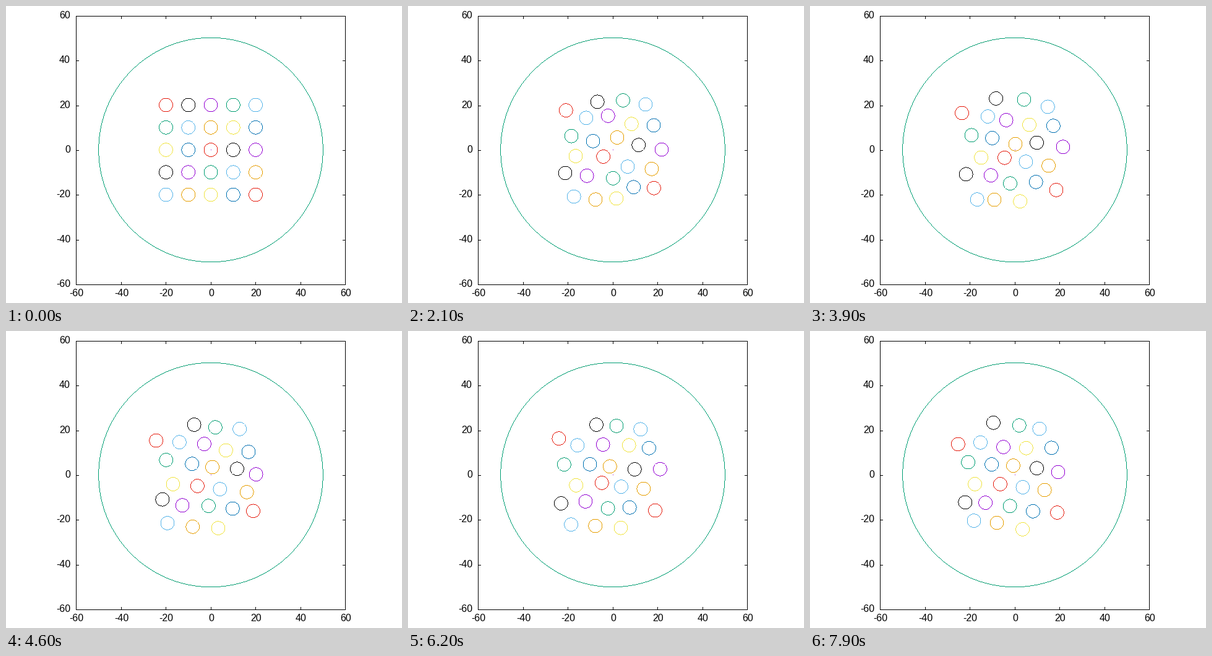
Write a matplotlib script that moves like this. It is 640 by 480 pixels and loops after 8000 ms.

```python
import numpy as np
import matplotlib.pyplot as plt
from matplotlib.animation import FuncAnimation
from matplotlib.collections import PolyCollection

W, H, DPI = 640, 480, 100
FRAMES, STEP = 80, 100
PX = 72 / DPI  # one pixel in points
LEFT, RIGHT, TOP, BOTTOM = 113, 548, 15, 449
CX, CY = (LEFT + RIGHT) / 2, (TOP + BOTTOM) / 2
UNIT = (RIGHT - LEFT) / 120
PALETTE = ["#9400D3", "#009E73", "#56B4E9", "#E69F00",
           "#F0E442", "#0072B2", "#E51E10", "#000000"]

# Packed rows from the top: first column, then the discs in order
PACKING = [(-1.0, (21, 23, 24)),
           (-2.5, (20, 16, 22, 18, 19)),
           (-2.0, (15, 11, 17, 13, 14)),
           (-1.5, (10, 12, 8, 9)),
           (-2.0, (5, 6, 7, 3, 4)),
           (-1.5, (0, 1, 2))]
COUNT = 25
SETTLE = 3.0  # seconds from square grid to packed lattice

plt.rcParams["font.family"] = "Liberation Sans"

fig = plt.figure(figsize=(W / DPI, H / DPI), dpi=DPI, facecolor="white")
ax = fig.add_axes([0, 0, 1, 1])
ax.set_xlim(0, W)
ax.set_ylim(H - 1, -1)  # whole numbers fall on whole pixels
ax.axis("off")


def line(xs, ys):
    ax.plot(xs, ys, color="black", lw=PX, antialiased=False,
            solid_joinstyle="miter")


def squares(pts):
    """Unit squares that fill the pixels at the given points."""
    corners = np.array([(0, 0), (1, 0), (1, -1), (0, -1)])
    return np.floor(pts + 0.5)[:, None, :] + corners


def dots(color, pts):
    art = PolyCollection(squares(pts), facecolors=color, edgecolors="none",
                         linewidths=0, antialiaseds=False)
    ax.add_collection(art, autolim=False)
    return art


def ring(cx, cy, r):
    """Points of a one-pixel circle: by column, then by row."""
    s = r / np.sqrt(2)
    x = np.arange(np.ceil(cx - s), cx + s)
    y = np.arange(np.ceil(cy - s), cy + s)
    dy = np.sqrt(r * r - (x - cx) ** 2)
    dx = np.sqrt(r * r - (y - cy) ** 2)
    return np.column_stack([np.r_[x, x, cx - dx, cx + dx],
                            np.r_[cy - dy, cy + dy, y, y]])


def draw_axes():
    line([LEFT, RIGHT, RIGHT, LEFT, LEFT], [TOP, TOP, BOTTOM, BOTTOM, TOP])
    font = dict(fontsize=16 * PX, va="baseline")
    for v in range(-60, 61, 20):
        x = int(CX + v * UNIT + 0.5)
        y = round(CY - v * (BOTTOM - TOP) / 120)
        for edge, d in ((TOP, 4), (BOTTOM, -4)):
            line([x, x], [edge, edge + d])
        for edge, d in ((LEFT, 4), (RIGHT, -4)):
            line([edge, edge + d], [y, y])
        ax.text(x + 1, 468, str(v), ha="center", **font)
        ax.text(104, y + 4, str(v), ha="right", **font)


# Positions are complex numbers in pixels, x + iy
row, col = np.divmod(np.arange(COUNT), 5)
grid = CX + (col - 2) * 10 * UNIT + 1j * (CY - (row - 2) * 10 * UNIT)

lattice = np.zeros(COUNT, complex)
for r, (first, ids) in enumerate(PACKING):
    for k, i in enumerate(ids):
        lattice[i] = (first + k) * 37.4 + 1j * (r - 2.5) * 32.5

rng = np.random.default_rng(4)
freq = rng.uniform(0.2, 0.6, (2, 2, COUNT))
phase = rng.uniform(0, 1, (2, 2, COUNT))


def wobble(t):
    """Thermal jitter that grows during the first second."""
    x, y = np.sin(2 * np.pi * (freq * t + phase)).sum(axis=0)
    return 2.5 * min(t, 1) * (x + 1j * y)


def centres(t):
    s = min(t / SETTLE, 1)
    ease = s * s * (3 - 2 * s)
    # The packed lattice turns and drifts slowly
    tilt = np.exp(1j * (0.14 - 0.012 * (t - SETTLE)))
    packed = 332.5 - 1.2 * (t - SETTLE) + 234.5j + lattice * tilt
    return grid + (packed - grid) * ease + wobble(t)


draw_axes()
dots(PALETTE[0], np.array([(331, 232)]))
dots(PALETTE[1], ring(CX, CY, 50 * UNIT))
discs = [dots(PALETTE[(i + 2) % 8], ring(z.real, z.imag, 3 * UNIT))
         for i, z in enumerate(grid)]


def update(n):
    for art, z in zip(discs, centres(n * STEP / 1000)):
        art.set_verts(squares(ring(z.real, z.imag, 3 * UNIT)))
    return discs


anim = FuncAnimation(fig, update, frames=FRAMES, interval=STEP,
                     repeat=True, repeat_delay=0, blit=False)
plt.show()
```
